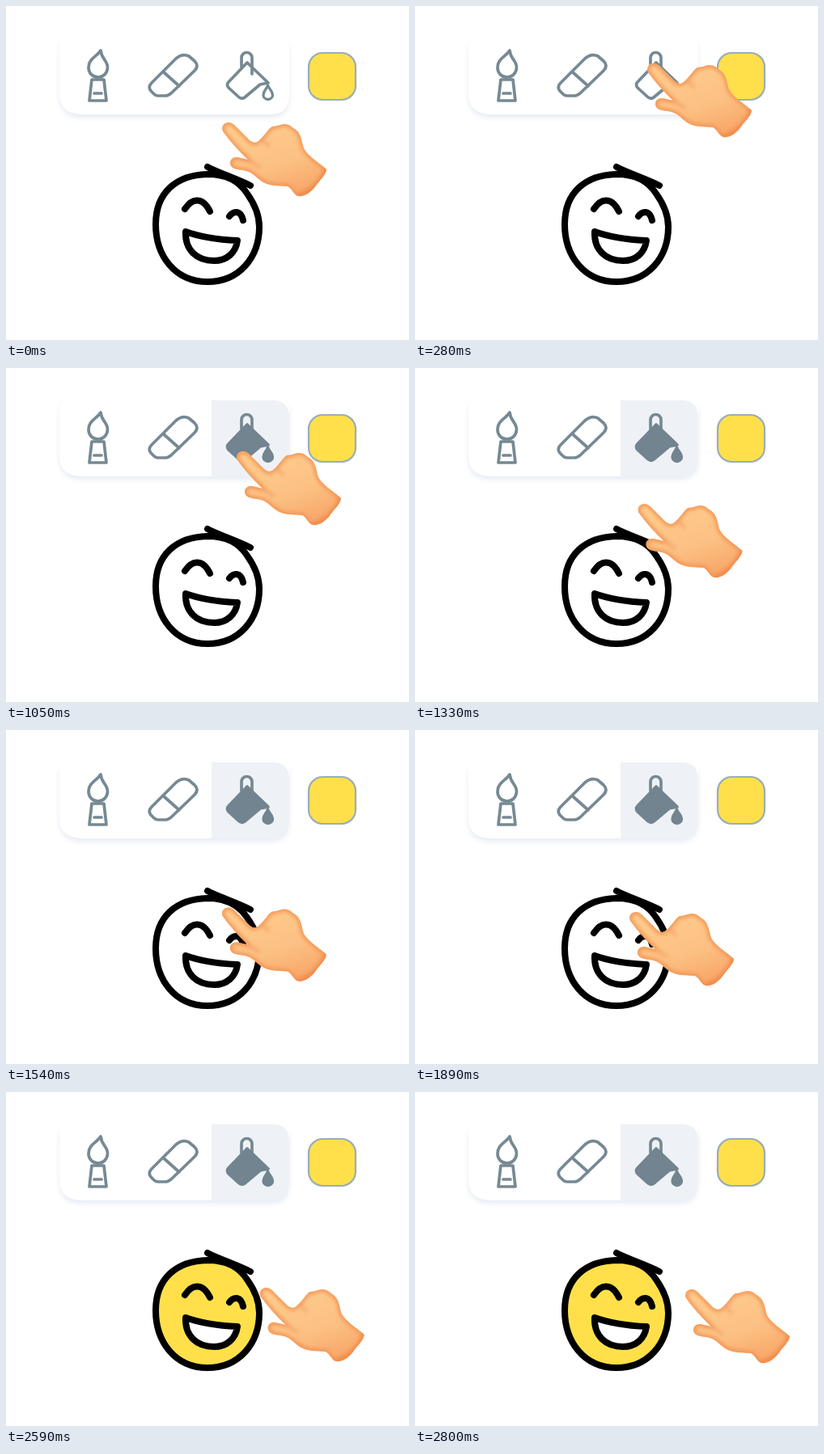
An HTML page that plays this animation: 498x413 px, repeating every 3.22 s.

```html
<!DOCTYPE html>
<html lang="en">
<head>
<meta charset="utf-8">
<title>Paint bucket</title>
<style>
  html, body { margin: 0; width: 100%; height: 100%; overflow: hidden; background: #fff; }
  svg { display: block; }
  .icon { fill: none; stroke: #768993; stroke-width: 3.7; stroke-linecap: round; stroke-linejoin: round; }
  .active .bucket { fill: #72848f; stroke: #72848f; }
  .highlight { visibility: hidden; }
  .active .highlight { visibility: visible; }
  .ink { fill: none; stroke: #000; stroke-width: 8; stroke-linecap: round; stroke-linejoin: round; }
  .white { fill: #fff; }
  .filled .skin { fill: #ffe04a; }
</style>
</head>
<body>
<svg width="498" height="413" viewBox="0 0 498 413">
  <defs>
    <filter id="shadow" x="-10%" y="-10%" width="120%" height="130%">
      <feDropShadow dx="0" dy="4" stdDeviation="3" flood-color="#dce4f0" flood-opacity=".7"/>
    </filter>
    <filter id="soft" x="-20%" y="-20%" width="140%" height="140%">
      <feGaussianBlur stdDeviation="2.5"/>
    </filter>
    <linearGradient id="flesh" gradientUnits="userSpaceOnUse" x1="325" y1="145" x2="355" y2="235">
      <stop offset="0" stop-color="#fecb8c"/>
      <stop offset=".55" stop-color="#fcc083"/>
      <stop offset="1" stop-color="#f8a668"/>
    </linearGradient>
    <path id="handShape" d="M268 155C264 146 275 140 282 147L301 166Q308 172 313 166C320 160 324 152 329 149C336 149 339 146 344 146C349 146 353 149 355 151C363 155 365 163 367 173C369 183 386 193 396 202C396 208 388 215 383 222C377 231 368 236 361 235C355 233 354 226 348 223C339 222 326 223 318 218C311 214 307 208 300 205C292 202 283 203 279 199C274 193 279 186 286 187L299 190Q281 173 268 155Z"/>
    <clipPath id="handClip"><use href="#handShape"/></clipPath>
  </defs>

  <g id="toolbar">
    <path class="white" filter="url(#shadow)" d="M66 52Q66 40 78 40H338Q350 40 350 52V110Q350 134 326 134H94Q66 134 66 108Z"/>
    <path class="highlight" fill="#eef2f6" d="M254 40H330Q350 40 350 61V112Q350 134 328 134H254Z"/>
    <g class="icon">
      <path d="M117 55C118 66 125.500 67 125.500 76C125.500 83 120 88 114 88C107 88 102 83 102 76C102 65 112 63 117 55Z"/>
      <path d="M106 91H121L124 117H103ZM109 108H118"/>
      <path d="M180 95L210 65Q218 58 226 62L233 68Q239 74 233 80L204 108Q200 111 197 111H188Q185 111 183 109L179 105Q175 100 180 95ZM195 82L214 99"/>
      <path d="M291 75V64a6.500 6.500 0 0 1 13 0V84"/>
      <path class="bucket" d="M298 70L275 94Q272 97 275 101L287 112Q291 116 295 113L314 97L324 95Z"/>
      <path class="bucket" stroke-width="3.300" d="M323.500 98C325 103 329.500 105 329.500 110a5.750 5.500 0 0 1-11.500 0C318 105 322 103 323.500 98Z"/>
    </g>
  </g>
  <rect x="374" y="58" width="58" height="58" rx="17.500" fill="#ffe04a" stroke="#9aadb7" stroke-width="2.200"/>

  <g id="face" class="ink">
    <path class="skin" d="M249 208C270 208 288 216 298 232C308 246 313 258 313 273C313 311 288 341 249 341C209 341 185 309 185 270C185 231 210 209 249 208Z"/>
    <path d="M249 199C262 206 284 213 302 222M221 251C227 242 232 240 237 240.500C244 241 248 246 252 254M276 260C281 253 290 252 293 265"/>
    <path class="white" d="M222 279C241 286 263 289 286 290C284 305 273 315 257 315C236 315 221 302 222 279Z"/>
  </g>

  <g id="hand">
    <use href="#handShape" fill="url(#flesh)"/>
    <g clip-path="url(#handClip)" fill="none" stroke-linecap="round">
      <g filter="url(#soft)">
        <use href="#handShape" stroke="#f39656" stroke-width="6"/>
        <path d="M299 190L313 199M314 166Q322 168 324 173" stroke="#f2a066" stroke-width="3"/>
        <path d="M396 202Q389 225 361 236" stroke="#f08a4c" stroke-width="7"/>
      </g>
    </g>
  </g>
</svg>
<script>
const STEP = 70, LOOP = 3220, PRESS = 420, FILL = 1960;

// Hand path: [step, x, y]
const path = [
  [0, 0, 0], [2, 13, -48], [4, 20, -73], [5, 21, -75], [8, 21, -59],
  [12, 20, -53], [15, 18, -41], [16, 16.5, -31], [19, 8.5, 24], [24, -3, 92],
  [27, -2, 81], [30, -3, 93], [32, -3, 93], [33, 4.5, 94], [36, 37, 97], [40, 67, 100], [46, 67, 100]
];

const $ = id => document.getElementById(id);

function slope(i, axis) {
  const a = path[i], b = path[i + 1];
  return (b[axis] - a[axis]) / (b[0] - a[0]);
}

// Monotone tangent: flat at turning points
function tangent(i, axis) {
  const last = path.length - 2;
  const before = slope(Math.max(i - 1, 0), axis), after = slope(Math.min(i, last), axis);
  return before * after <= 0 ? 0 : 2 * before * after / (before + after);
}

function position(step, axis) {
  const i = path.findLastIndex(key => key[0] <= step);
  const [a, b] = [path[i], path[i + 1]];
  const span = b[0] - a[0], u = (step - a[0]) / span, v = 1 - u;
  return a[axis] * v * v * (1 + 2 * u) + b[axis] * u * u * (3 - 2 * u)
    + span * u * v * (v * tangent(i, axis) - u * tangent(i + 1, axis));
}

function draw() {
  const time = performance.now() % LOOP;
  const step = Math.floor(time / STEP);
  $("hand").setAttribute("transform", `translate(${position(step, 1)} ${position(step, 2)})`);
  $("toolbar").classList.toggle("active", time >= PRESS);
  $("face").classList.toggle("filled", time >= FILL);
  requestAnimationFrame(draw);
}
draw();
</script>
</body>
</html>
```
